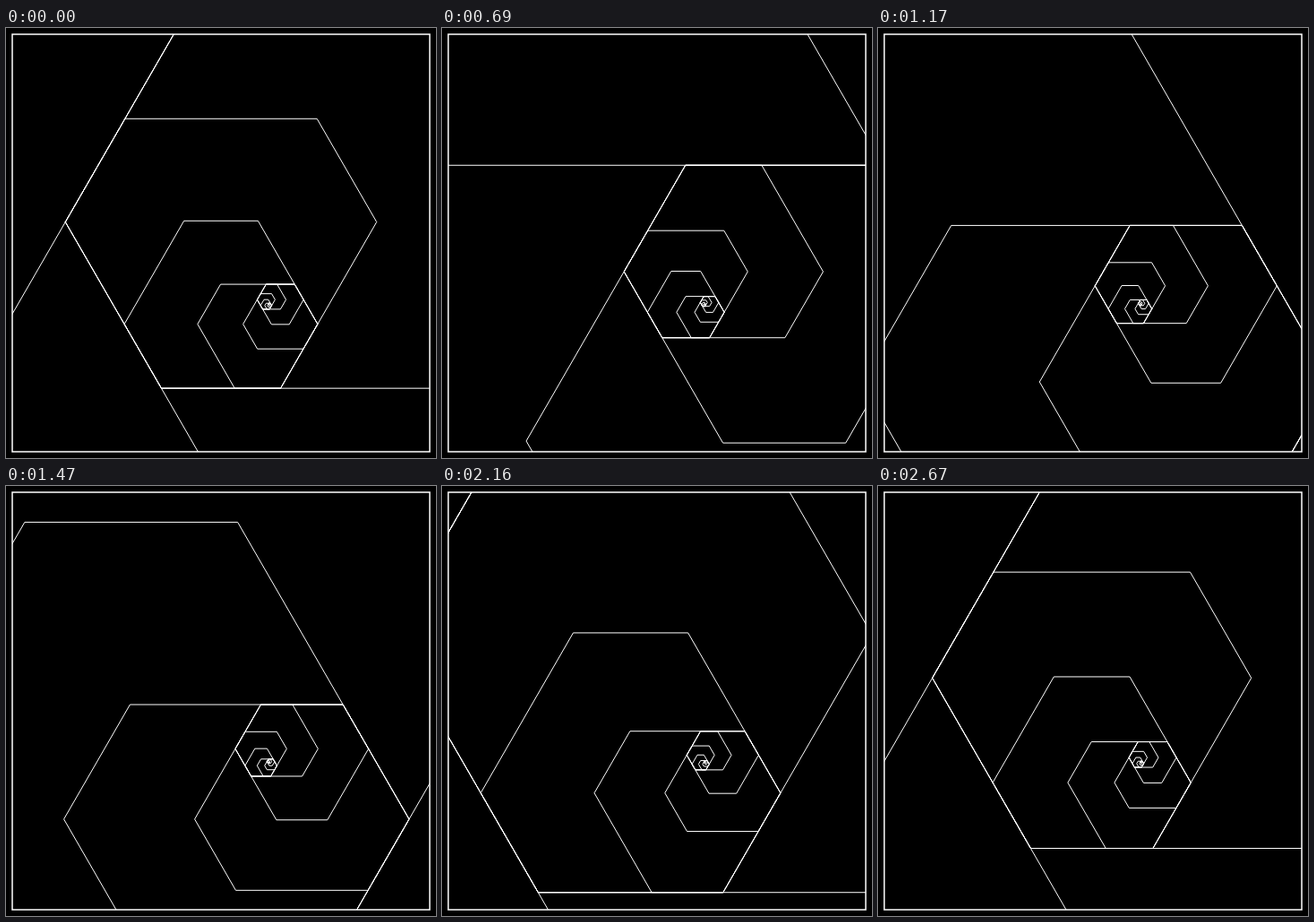
Recreate the animation shown at these times as an HTML page with a canvas. Size 480 by 480 pixels, loop 2700 ms.

```html
<!DOCTYPE html>
<html lang="en">
<head>
<meta charset="utf-8">
<title>Hexagon spiral</title>
<style>
  html, body { margin: 0; width: 100%; height: 100%; overflow: hidden; background: #000; }
  canvas { display: block; width: 480px; height: 480px; }
</style>
</head>
<body>
<canvas id="stage" width="480" height="480"></canvas>
<script>
const ctx = document.getElementById('stage').getContext('2d');
const LOOP = 2700, STEP = 30, TURNS = 6;
const RATIO = 1.61;        // long side / short side, and size of each hexagon to the next
const RADIUS = 175.3, MID = 240;
const SIXTH = Math.PI / 3;

// Hexagon with alternating sides, inscribed in a circle, short side at the bottom.
const half = Math.asin(0.5 / Math.sqrt((RATIO * RATIO + RATIO + 1) / 3));
const angles = [];
for (let i = 0; i < 3; i++) {
  const a = Math.PI / 2 + i * 2 * SIXTH;
  angles.push(a - half, a + half);
}

// Eye of the spiral: the point that stays put when shrinking and turning by a sixth.
const shift = RADIUS * (Math.cos(half) - Math.cos(SIXTH - half) / RATIO);
const p = 1 - Math.cos(SIXTH) / RATIO, q = Math.sin(SIXTH) / RATIO;
const eyeX = shift * q / (p * p + q * q);
const eyeY = shift * p / (p * p + q * q);
const hexagon = angles.map(a => [RADIUS * Math.cos(a) - eyeX, RADIUS * Math.sin(a) - eyeY]);

// Zoom curve: [tick, hexagons passed, speed], fast at first and slowing down.
const curve = [
  [0, 0, 0.0850], [14, 1.186, 0.0842], [23, 1.938, 0.0800], [39, 3.128, 0.0687],
  [59, 4.378, 0.0570], [72, 5.079, 0.0520], [90, TURNS, 0.0515]
];

function zoomAt(tick) {
  let i = 0;
  while (tick >= curve[i + 1][0]) i++;
  const [t0, y0, v0] = curve[i], [t1, y1, v1] = curve[i + 1];
  const d = t1 - t0, s = (tick - t0) / d, r = 1 - s;
  return y0 * (1 + 2 * s) * r * r + v0 * d * s * r * r
       + y1 * s * s * (3 - 2 * s) - v1 * d * s * s * r;
}

function drawHexagon(n, zoom) {
  const size = RATIO ** -(n + zoom);
  const cos = Math.cos(n * SIXTH) * size, sin = Math.sin(n * SIXTH) * size;
  ctx.beginPath();
  for (const [x, y] of hexagon) {
    ctx.lineTo(MID + eyeX + x * cos + y * sin, MID + eyeY + y * cos - x * sin);
  }
  ctx.closePath();
  ctx.stroke();
}

function draw(now) {
  const zoom = zoomAt(Math.floor(now % LOOP / STEP));
  ctx.fillStyle = '#000';
  ctx.fillRect(0, 0, 480, 480);
  ctx.strokeStyle = '#fff';

  ctx.save();
  ctx.beginPath();
  ctx.rect(7, 7, 466, 466);
  ctx.clip();
  ctx.lineWidth = 1;
  for (let i = -8; i <= 11; i++) drawHexagon(i - Math.floor(zoom), zoom);
  ctx.restore();

  ctx.lineWidth = 1.5;
  ctx.strokeRect(7, 7, 466, 466);
}

const start = performance.now();
function loop() {
  draw(performance.now() - start);
  requestAnimationFrame(loop);
}
loop();
</script>
</body>
</html>
```
